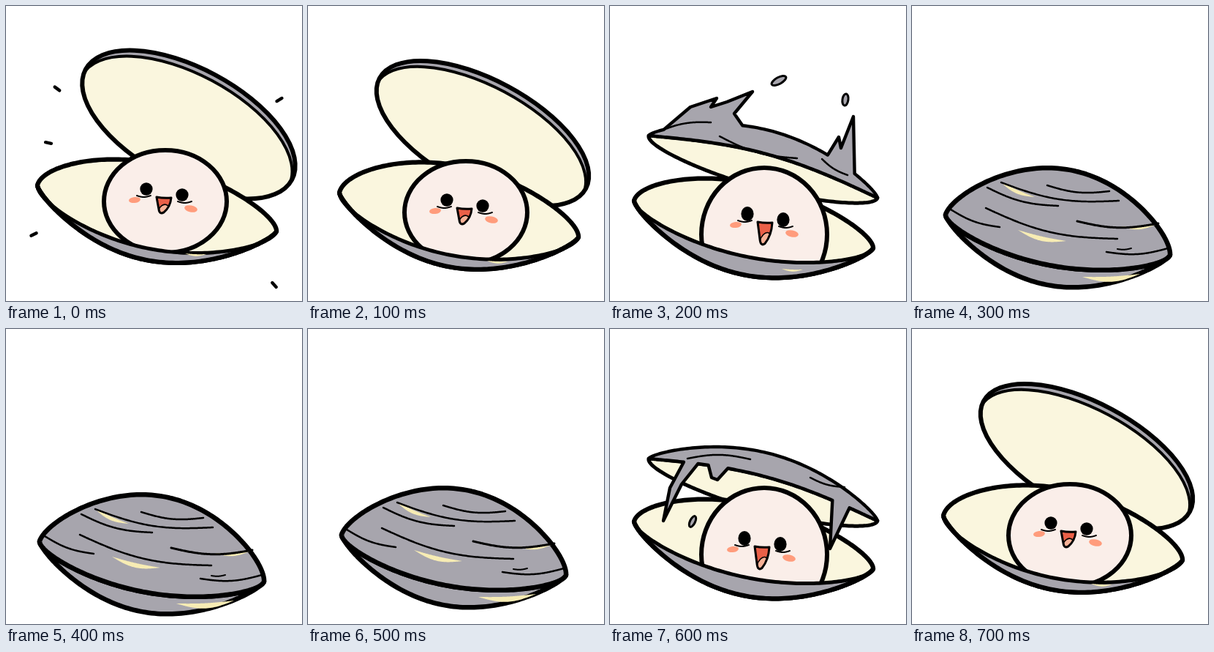
Animation, 405 px wide and 403 px high, one loop 0.8 s. Source, as an HTML page with a canvas:

```html
<!DOCTYPE html>
<html lang="en">
<head>
<meta charset="utf-8">
<title>Clam and pearl</title>
<style>
  html, body { margin: 0; width: 100%; height: 100%; overflow: hidden; background: #fff; }
  canvas { display: block; width: 100vw; height: 100vh; }
</style>
</head>
<body>
<canvas id="stage"></canvas>
<script>
const W = 405, H = 403, STEP = 100;
const GREY = '#a7a5ad', CREAM = '#faf6de', PINK = '#faeee9';
const GOLD = '#f7ecb4', BLUSH = '#ff9c7c', RED = '#ea6048', INK = '#000';

const canvas = document.getElementById('stage');
const ctx = canvas.getContext('2d');

// Points of a bulging edge from a to b; positive bulges hang down.
// Each spike replaces the stretch between two positions with its own tips.
function arc(a, b, bulge, power = 0.65, skew = 1, spikes = []) {
  const dx = b[0] - a[0], dy = b[1] - a[1], len = Math.hypot(dx, dy);
  const pts = [], n = 120;
  for (let i = 0; i <= n; i++) {
    const t = (1 - Math.cos(Math.PI * i / n)) / 2;
    const spike = spikes.find(s => t > s.from && t < s.to);
    if (spike) {
      if (!pts.includes(spike.tips[0])) pts.push(...spike.tips);
      continue;
    }
    const d = bulge * Math.abs(Math.sin(Math.PI * t ** skew)) ** power / len;
    pts.push([a[0] + dx * t - dy * d, a[1] + dy * t + dx * d]);
  }
  return pts;
}

function trace(pts) {
  const path = new Path2D();
  pts.forEach(p => path.lineTo(...p));
  return path;
}

function between(top, bottom) {
  const path = trace([...top, ...[...bottom].reverse()]);
  path.closePath();
  return path;
}

function oval(x, y, rx, ry, turn = 0) {
  const path = new Path2D();
  path.ellipse(x, y, rx, ry, turn, 0, Math.PI * 2);
  return path;
}

function fill(path, color) {
  ctx.fillStyle = color;
  ctx.fill(path);
}

function line(path, width) {
  ctx.strokeStyle = INK;
  ctx.lineWidth = width;
  ctx.stroke(path);
}

function shape(path, color, width) {
  fill(path, color);
  line(path, width);
}

function clipped(path, draw) {
  ctx.save();
  ctx.clip(path);
  draw();
  ctx.restore();
}

function at(x, y, draw) {
  ctx.save();
  ctx.translate(x, y);
  draw();
  ctx.restore();
}

// Hand-drawn crease whose sag grows with its length.
function crease(x1, y1, x2, y2, width = 2.5) {
  const a = [x1, y1], b = [x2, y2];
  line(trace(arc(a, b, Math.hypot(x2 - x1, y2 - y1) * 0.065, 1)), width);
}

function glint(x1, y1, x2, y2) {
  const a = [x1, y1], b = [x2, y2], len = Math.hypot(x2 - x1, y2 - y1);
  fill(between(arc(a, b, len * 0.02, 1), arc(a, b, len * 0.11, 1)), GOLD);
}

// Placed by the centre of the left eye.
function face(x, y, eyeH, depth) {
  const mouth = new Path2D(`M14 11 Q24 13 34 12 Q33 ${11 + depth * 0.6} 24 ${11 + depth * 0.95}
    Q18 ${11 + depth * 1.1} 17 ${11 + depth * 0.75} Z`);
  at(x, y, () => {
    fill(oval(-16, 15, 8, 4, -0.12), BLUSH);
    fill(oval(61, 27, 9, 4.6, 0.2), BLUSH);
    for (const [ex, ey] of [[0, 0], [49, 8]]) {
      const out = ex ? 1 : -1;
      fill(oval(ex, ey, 8.6, eyeH), INK);
      line(trace(arc([ex + out * 13, ey + 9], [ex - out * 6, ey + 9], out * -2, 1)), 2);
    }
    fill(mouth, RED);
    clipped(mouth, () =>
      shape(oval(24, 11 + depth * 0.95, 8, depth * 0.5, 0.3), '#f7b196', 1.6));
    line(mouth, 3);
  });
}

function openLid({ x, y, b }) {
  const turn = 0.49, depth = 9;
  const rim = oval(x, y, 160, b, turn);
  fill(rim, GREY);
  clipped(rim, () => shape(
    oval(x - depth * Math.sin(turn), y + depth * Math.cos(turn), 160, b, turn), CREAM, 4));
  line(rim, 6);
}

const HINGE = [[53, 177], [366, 262]];

function halfLid() {
  shape(between(arc(...HINGE, -18, 1), arc(...HINGE, 29, 0.5)), CREAM, 5);
}

function lidBack({ splash, drips, creases, drops }) {
  const top = arc(...HINGE, -50, 0.75, 1, splash);
  shape(between(top, arc(...HINGE, -18, 1, 1, drips)), GREY, 4.4);
  creases.forEach(c => crease(...c));
  drops.forEach(d => shape(oval(...d), GREY, 3));
}

function clam({ lid, back, left, right, top, rim, bottom, pearl, eye, laugh, shine }) {
  const upper = arc(left, right, -top, 0.6, 0.9);
  const middle = arc(left, right, rim, 0.6);
  const lower = arc(left, right, bottom, 0.75);
  lid ? openLid(lid) : halfLid();
  shape(between(upper, lower), CREAM, 6.2);
  clipped(trace([[0, 0], ...middle, [W, 0]]), () => shape(oval(...pearl), PINK, 6));
  shape(between(middle, lower), GREY, 5);
  line(trace(lower), 6.2);
  if (shine) glint(left[0] + 202, left[1] + 93, left[0] + 231, left[1] + 94);
  face(...eye, laugh ? 10 : 8.8, laugh ? 31 : 22);
  if (back) lidBack(back);
}

const open = {
  lid: { x: 250, y: 162, b: 77 },
  left: [43, 245], right: [370, 308], top: 60, rim: 56, bottom: 72,
  pearl: [218, 267, 84, 70], eye: [192, 250], shine: true
};

const ajar = {
  ...open,
  lid: { x: 239, y: 174, b: 73 },
  left: [43, 255], right: [370, 316], top: 66,
  pearl: [216, 282, 84, 70], eye: [190, 265]
};

const falling = {
  left: [33, 266], right: [360, 331], top: 55, rim: 45, bottom: 70,
  pearl: [211, 312, 86, 91], eye: [188, 284], laugh: true, shine: true,
  back: {
    splash: [
      { from: 0.06, to: 0.37, tips: [[110, 138], [146, 126], [138, 138], [160, 131], [195, 117], [170, 147]] },
      { from: 0.76, to: 0.88, tips: [[313, 179], [316, 194], [333, 151]] }
    ],
    creases: [[138, 159, 68, 171], [150, 178, 256, 208], [290, 209, 325, 231]],
    drops: [[231, 102, 11, 4.5, -0.5], [322, 128, 4, 8, 0.15]]
  }
};

const rising = {
  ...falling,
  left: [33, 263], right: [360, 328],
  pearl: [211, 308, 86, 91], eye: [184, 286], shine: false,
  back: {
    drips: [
      { from: 0.15, to: 0.2, tips: [[82, 217], [73, 262], [98, 212]] },
      { from: 0.26, to: 0.33, tips: [[139, 203], [147, 206]] },
      { from: 0.8, to: 0.87, tips: [[301, 300]] }
    ],
    creases: [[192, 178, 106, 177], [274, 203, 321, 216]],
    drops: [[113, 263, 3.5, 8, 0.45]]
  }
};

function closed() {
  const ends = [[46, 285], [353, 340]];
  const seam = arc(...ends, 43, 0.6);
  shape(between(seam, arc(...ends, 70, 0.75)), GREY, 6.5);
  glint(233, 370, 312, 366);
  shape(between(arc(...ends, -90), seam), GREY, 6.5);
  glint(121, 240, 168, 261);
  glint(285, 301, 333, 299);
  glint(145, 306, 211, 321);
  crease(185, 245, 270, 253);
  crease(122, 241, 283, 266);
  crease(103, 248, 200, 273);
  crease(226, 294, 337, 297, 3);
  crease(101, 276, 281, 318);
  crease(53, 278, 120, 302);
  crease(266, 336, 350, 331);
  crease(281, 332, 300, 331, 2);
}

// Short dashes pointing away from the clam.
function sparks() {
  for (const [x, y] of [[70, 113], [374, 128], [58, 187], [38, 312], [367, 381]]) {
    const turn = Math.atan2(y - 220, x - 218);
    const dx = 4 * Math.cos(turn), dy = 4 * Math.sin(turn);
    line(trace([[x - dx, y - dy], [x + dx, y + dy]]), 4.4);
  }
}

const poses = [
  () => { clam(open); sparks(); },
  () => clam(ajar),
  () => clam(falling),
  closed,
  () => at(0, 5, closed),
  () => at(0, -4, closed),
  () => clam(rising),
  () => clam(ajar)
];

function frame(now) {
  const dpr = window.devicePixelRatio || 1;
  const w = Math.round(innerWidth * dpr), h = Math.round(innerHeight * dpr);
  if (canvas.width !== w || canvas.height !== h) {
    canvas.width = w;
    canvas.height = h;
  }
  ctx.setTransform(w / W, 0, 0, h / H, 0, 0);
  ctx.fillStyle = '#fff';
  ctx.fillRect(0, 0, W, H);
  ctx.lineCap = ctx.lineJoin = 'round';
  poses[Math.floor(now / STEP) % poses.length]();
  requestAnimationFrame(frame);
}
requestAnimationFrame(frame);
</script>
</body>
</html>
```
